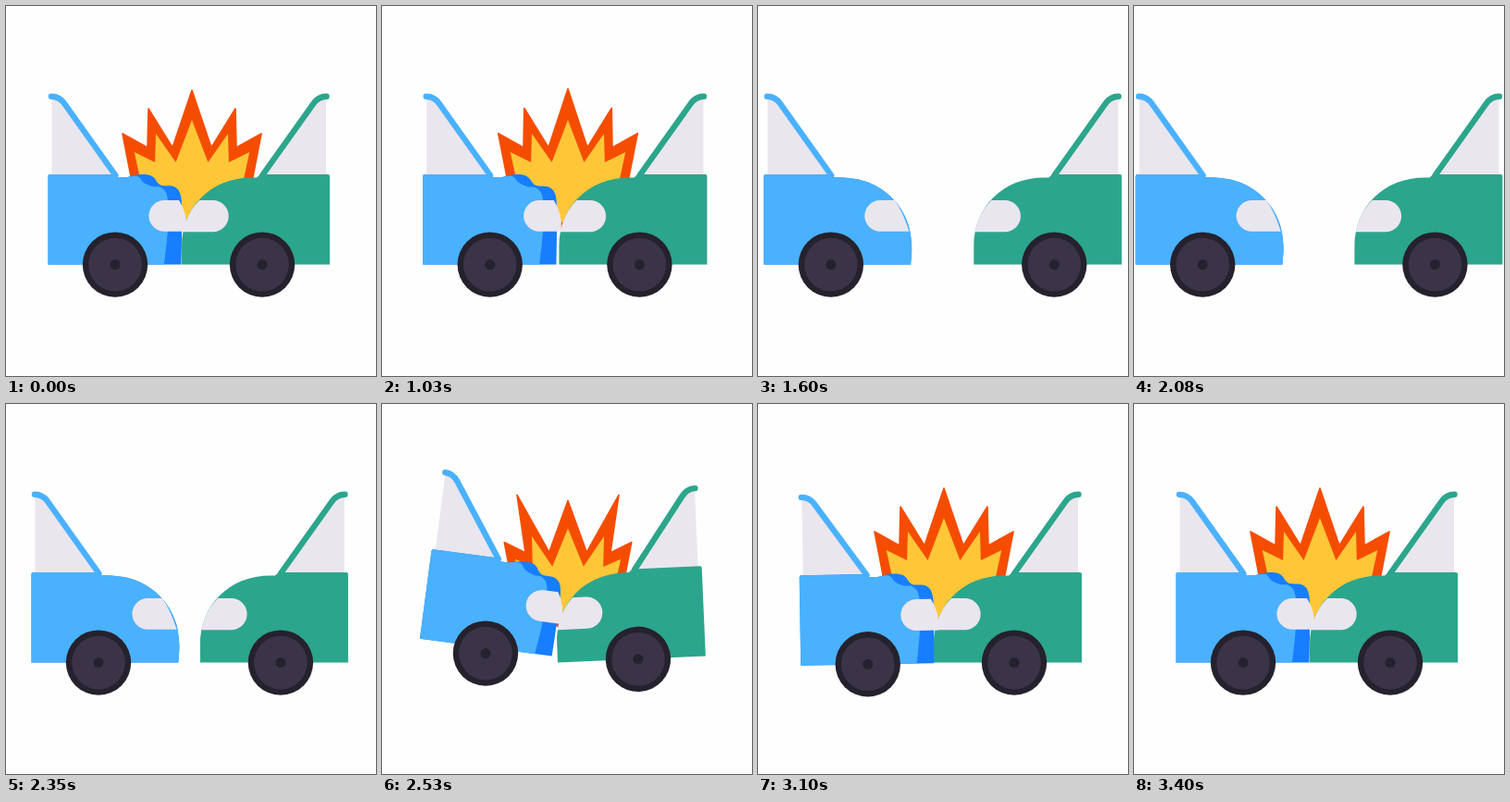
An HTML page that plays this animation: 400 px wide and 400 px high, repeating every 3430 ms.

```html
<!DOCTYPE html>
<html lang="en">
<head>
<meta charset="utf-8">
<title>Crash</title>
<style>
html, body { margin: 0; width: 100%; height: 100%; overflow: hidden; background: #fefefe; }
svg { display: block; width: 100%; height: 100%; }
.glass { fill: #eae6ee; }
.pillar { fill: none; stroke-width: 6.4; stroke-linecap: round; stroke-linejoin: round; }
</style>
</head>
<body>
<svg viewBox="0 0 400 400">
  <defs>
    <g id="wheel">
      <circle r="35.2" fill="#25212d"/>
      <circle r="28.8" fill="#3b3348"/>
      <circle r="5.5" fill="#25212d"/>
    </g>
    <path id="window" class="glass" d="M49.5 99H54L64 107L115 183H49.5Z"/>
    <path id="pillar" class="pillar" d="M49 97.8Q58 97.8 63.5 106L118.3 183"/>
  </defs>
  <g id="burst" stroke-linejoin="round">
    <path id="flame" fill="#f54d00" stroke="#f54d00" stroke-width="1.6"/>
    <path id="core" fill="#ffc738"/>
  </g>
  <g id="green">
    <g transform="matrix(-1 0 0 1 395.5 0)">
      <use href="#window"/>
      <use href="#pillar" stroke="#2ca58d"/>
    </g>
    <path fill="#2ca58d" d="M190 279.5V260C190 217 222 185.5 266 185.5H271L275 182H348Q350 182 350 184V279.5Z"/>
    <path class="glass" d="M223.5 210H209C200 219 194 231 191.3 244.3H223.5A17.15 17.15 0 0 0 223.5 210Z"/>
    <use href="#wheel" x="277" y="279.6"/>
  </g>
  <g id="blue">
    <use href="#window"/>
    <use href="#pillar" stroke="#4ab1ff"/>
    <path id="fold" fill="#167eff"/>
    <path id="body" fill="#4ab1ff"/>
    <path id="lamp" class="glass"/>
  </g>
  <use id="tyre" href="#wheel"/>
</svg>
<script>
const LOOP = 3430, STEP = 30, HIT = 2390, TOP = 2640;
const set = (id, name, value) => document.getElementById(id).setAttribute(name, value);
const mix = (a, b, k) => a + (b - a) * k;

const both = x => (1 - Math.cos(Math.PI * x)) / 2;
const out = x => Math.sin(Math.PI * x / 2);
const rush = x => x * x;
const line = x => x;

// Eased progress from 0 to 1 between two times
const span = (t, from, to, ease = both) =>
  ease(Math.min(1, Math.max(0, (t - from) / (to - from))));

// Jolt at the hit: up to peak, down to dip, then back to rest
const jolt = (t, peak, top, dip, low) =>
  peak * span(t, HIT, top, out) + (dip - peak) * span(t, top, low) - dip * span(t, low, LOOP);

// One half of the burst, measured from its middle, outer spike first
const MID = [201, 215];
const TIPS = [[75, 77], [47, 104], [0, 124]];
const DIPS = [[48, 62], [21, 62]];
const SPIKES = [
  { swell: 0.1, peak: 1.19, top: TOP, rest: 3030 },
  { swell: 0.12, peak: 1.17, top: 2530, rest: 2680 },
  { swell: 0.27, peak: 1.21, top: TOP, rest: 2960 }
];

function size(t, { swell, peak, top, rest }) {
  if (t < HIT) return 1 + swell * span(t, 1010, 1160) - (1 + swell) * span(t, 1160, 1340);
  return peak * span(t, HIT, top, out) + (1 - peak) * span(t, top, rest);
}

function star(sizes, sx, sy, lift) {
  const at = ([x, y], k) => [MID[0] + x * k * sx, MID[1] + lift - y * k * sy];
  const small = sizes.map(s => Math.min(s, 1));
  const pts = [at([-4, -28], small[0])];
  const side = dir => {
    const put = ([x, y], k) => at([dir * x, y], k);
    const half = [put([63, 15], small[0])];
    TIPS.forEach((tip, i) => {
      half.push(put(tip, sizes[i]));
      if (DIPS[i]) half.push(put(DIPS[i], (small[i] + small[i + 1]) / 2));
    });
    return half;
  };
  pts.push(...side(-1), ...side(1).reverse());
  return 'M' + pts.map(p => p.map(v => v.toFixed(2)).join(' ')).join('L') + 'Z';
}

// Front edge of the blue car: whole, crushed, and the fold behind it
const FLOOR = 279.5;
const bezier = (a, b, c, d, u) =>
  a * (1 - u) ** 3 + 3 * b * u * (1 - u) ** 2 + 3 * c * u * u * (1 - u) + d * u ** 3;
const whole = Array.from({ length: 7 }, (_, i) => [
  bezier(128, 172, 205, 205.3, i / 6),
  bezier(185.3, 185.3, 217, 260, i / 6)
]).concat([[204.3, FLOOR]]);
const bent = [[130, 185.3], [142, 184], [149, 191], [158, 195], [168, 196.5], [174.5, 207], [175, 240], [171, FLOOR]];
const folded = [[130, 185.3], [146, 182], [158, 184], [167, 193.5], [182, 195.5], [189.3, 207], [190, 243], [189.5, FLOOR]];

// Smooth curve through all points
function curve(p) {
  let d = '';
  for (let i = 0; i < p.length - 1; i++) {
    const a = p[Math.max(i - 1, 0)], b = p[i], c = p[i + 1], e = p[Math.min(i + 2, p.length - 1)];
    const pts = [0, 1].map(k => b[k] + (c[k] - a[k]) / 6)
      .concat([0, 1].map(k => c[k] - (e[k] - b[k]) / 6), c);
    d += 'C' + pts.map(v => v.toFixed(2)).join(' ');
  }
  return d;
}

function nose(shape, k) {
  const p = whole.map((q, i) => [mix(q[0], shape[i][0], k), mix(q[1], shape[i][1], k)]);
  return `M45.5 184Q45.5 182 47.5 182H118L121 185.3H${p[0][0]}${curve(p)}H45.5Z`;
}

function draw(t) {
  const gap = (37.6 * span(t, 975, 1440) + 6.5 * span(t, 1440, 2110, line)) * (1 - span(t, 2150, HIT + 20, rush));
  const crush = 1 - span(t, 1010, 1260) + span(t, 2365, 2440);
  const tilt = jolt(t, 9.8, TOP, -1.2, 2950);
  const hop = jolt(t, -13, TOP, 2.5, 2900);
  const nudge = jolt(t, -2.6, 2560, 0, 2920);

  set('blue', 'transform', `translate(${-gap} 0) rotate(${tilt} 239 232)`);
  set('tyre', 'transform', `translate(${118 - gap - 0.8 * tilt} ${279.6 + hop})`);
  set('green', 'transform', `translate(${1.105 * gap} 0) rotate(${nudge} 190 279)`);

  set('fold', 'd', nose(folded, crush));
  set('body', 'd', nose(bent, crush));
  set('lamp', 'd', `M171.3 210H187Q196.5 224 ${mix(202.5, 195, crush)} 243.8H171.3A16.9 16.9 0 0 1 171.3 210Z`);

  const sizes = SPIKES.map(s => size(t, s));
  const lift = t < HIT ? 0 : 22 * (1 - span(t, HIT, TOP, out));
  set('flame', 'd', star(sizes, 1, 1, lift));
  set('core', 'd', star(sizes.map(s => Math.min(s, 1)), 0.83, 0.74, lift));
  set('burst', 'visibility', Math.max(...sizes) > 0.01 ? 'visible' : 'hidden');
}

function tick() {
  const t = performance.now() % LOOP;
  draw(t < 1030 ? 0 : 10 + Math.floor((t - 10) / STEP) * STEP);
  requestAnimationFrame(tick);
}
tick();
</script>
</body>
</html>
```
